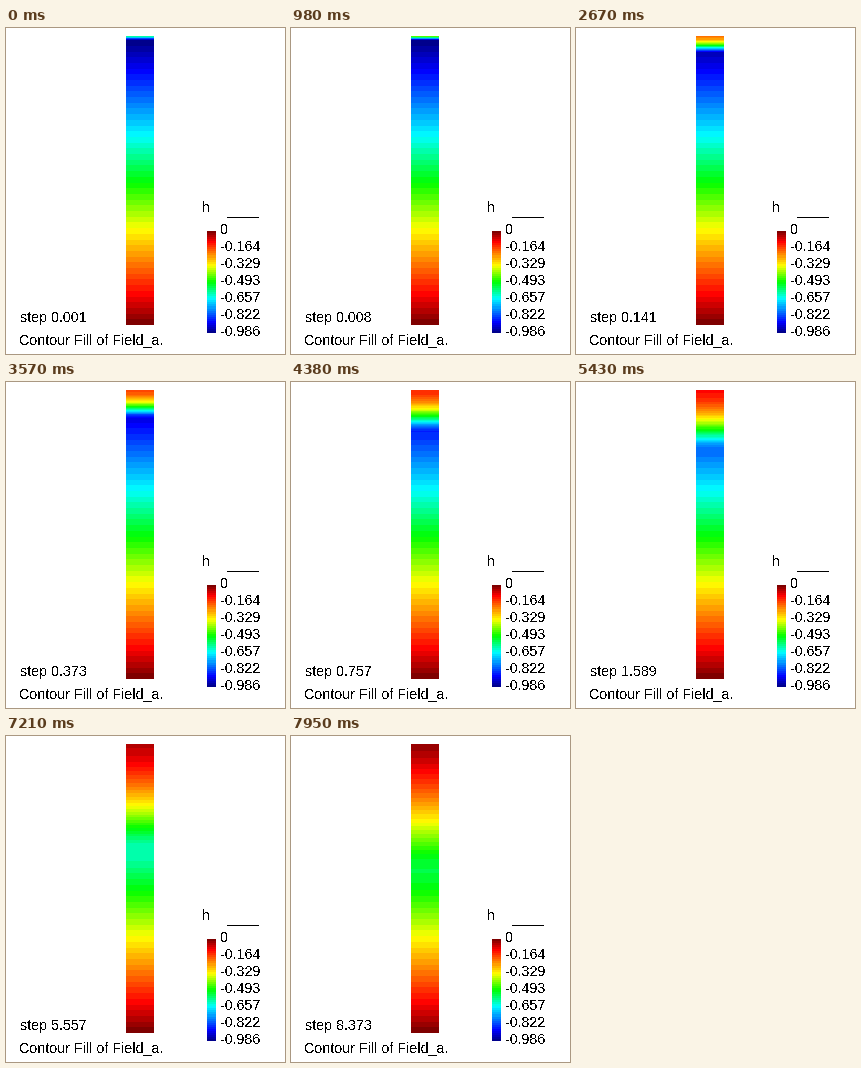
Write a matplotlib script that moves like this. It is 279 by 326 pixels and loops after 8000 ms.

```python
import numpy as np
import matplotlib.pyplot as plt
from matplotlib.animation import FuncAnimation

plt.rcParams["font.family"] = "Liberation Sans"

W, H, DPI = 279, 326, 100
LOOP, TICK = 8000, 20
BANDS = 50
TOP, BOTTOM, LEFT, RIGHT = 8, 297, 120, 148
ELEMENTS = 70

# The time step doubles from 1 to 256 thousandths after these step counts
dt = np.repeat(2 ** np.arange(9), [8, 6, 6, 13, 10, 18, 15, 15, 18])
sim_time = np.cumsum(np.r_[1, dt]) / 1000

# Playback pace: key change numbers and the moments they appear
changes = np.interp(np.arange(len(dt)), np.r_[0:85:12, 97, 108],
                    [560, 1370, 2180, 3010, 3850, 4660, 5500, 6330, 7210, 7950])

# Dark blue, blue, cyan, green, yellow, red, dark red
STOPS = [0, 0.1, 1 / 3, 0.5, 2 / 3, 0.9, 1]
RED = [0, 0, 0, 0, 1, 1, 0.5]
GREEN = [0, 0, 1, 1, 1, 0, 0]
BLUE = [0.55, 1, 1, 0, 0, 0, 0]


def colours(v):
    band = np.clip(np.floor(v * BANDS), 0, BANDS - 1) / (BANDS - 1)
    return np.stack([np.interp(band, STOPS, c) for c in (RED, GREEN, BLUE)],
                    axis=-1)


def head(t):
    """Normalised head down the column, 0 = driest, 1 = saturated."""
    height = BOTTOM - TOP
    nodes = np.linspace(0, height, ELEMENTS + 1)
    # hydrostatic profile, scaled so the second node is the driest
    base = (nodes / height - 1 / ELEMENTS) / (1 - 1 / ELEMENTS)
    # wetting front sinking from the surface
    surface = 1 - 0.14 * t ** -0.2 + 0.008 * t
    depth = 36 * t ** 0.54
    front = surface - 0.5 * (nodes / depth) ** (1.88 - 0.075 * t)
    soft = min(0.06, 0.002 * depth)
    v = soft * np.logaddexp(base / soft, front / soft)
    return np.interp(np.arange(height) + 0.5, nodes, v)


fig = plt.figure(figsize=(W / DPI, H / DPI), dpi=DPI, facecolor="white")
ax = fig.add_axes([0, 0, 1, 1])
ax.axis("off")

canvas = np.ones((H, W, 3))
legend = 1 - (np.arange(102) + 0.5) / 102
canvas[203:305, 201:210] = colours(legend)[:, None]
canvas[189, 221:253] = 0
image = ax.imshow(canvas, extent=(0, W, H, 0), interpolation="nearest",
                  aspect="auto", vmin=0, vmax=1)
ax.set_xlim(0, W)
ax.set_ylim(H, 0)


def label(x, y, s):
    return ax.text(x, y, s, fontsize=14.3 * 72 / DPI, color="black",
                   va="baseline", antialiased=False)


label(13, 316, "Contour Fill of Field_a.")
label(196, 184, "h")
for i in range(7):
    value = -0.986 * i / 6
    label(214.4, 206 + 17 * i, f"{value:.3f}" if i else "0")
step_text = label(13.5, 294, "")


def draw(i):
    k = np.searchsorted(changes, i * TICK + TICK / 2, side="right")
    t = sim_time[k]
    canvas[TOP:BOTTOM, LEFT:RIGHT] = colours(head(t))[:, None]
    image.set_data(canvas)
    step_text.set_text(f"step {t:.3f}")
    return image, step_text


anim = FuncAnimation(fig, draw, frames=LOOP // TICK, interval=TICK,
                     repeat=True, repeat_delay=0, blit=False)
plt.show()
```
